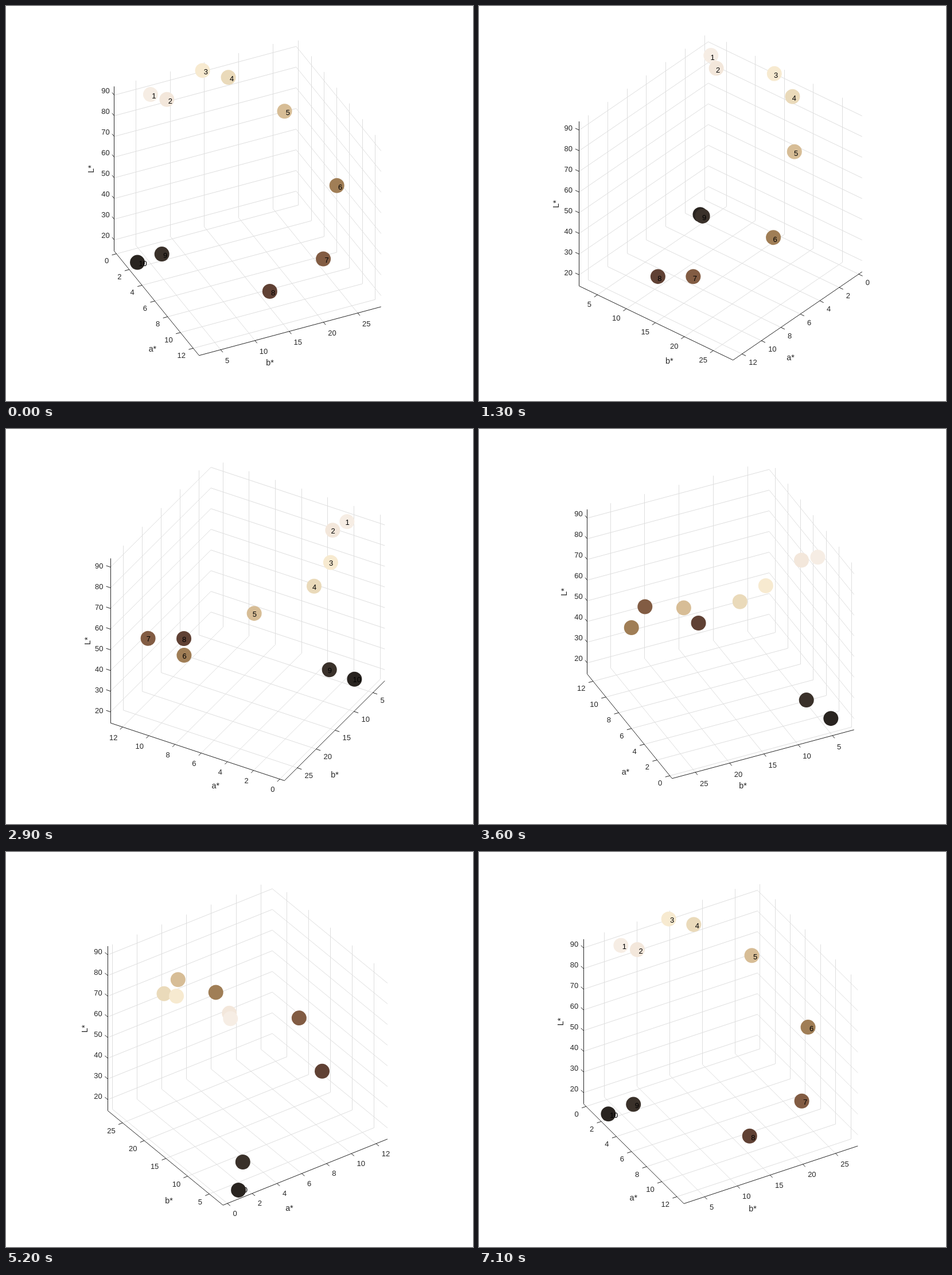
These frames come from a looping animation (814 px wide and 688 px high, 7.2 s). An HTML page:

```html
<!DOCTYPE html>
<html lang="en">
<head>
<meta charset="utf-8">
<title>Rotating L*a*b* plot</title>
<style>
  html, body { margin: 0; width: 100%; height: 100%; overflow: hidden; background: #fff; }
  svg { display: block; width: 814px; height: 688px; }
  text { font-family: "Liberation Sans", Arial, sans-serif; font-size: 13px; text-anchor: middle; fill: #262626; }
  .name { font-size: 14.3px; }
  .tag { text-anchor: start; fill: #000; }
  path { fill: none; stroke-width: 1; }
  .grid { stroke: #dedede; }
  .axis { stroke: #262626; }
</style>
</head>
<body>
<svg id="plot" viewBox="0 0 814 688"></svg>
<script>
const plot = document.getElementById("plot");
const CX = 421.2, CY = 332, SIDE = 350, TICK = 0.025;
const RAD = Math.PI / 180;
const SIN_EL = Math.sin(35 * RAD), COS_EL = Math.cos(35 * RAD);
const STEP_MS = 100, STEPS = 72;

// Axis ranges in the order a*, b*, L*
const LOW = [-0.35, 1.85, 14.61];
const HIGH = [12.92, 28.4, 94.21];
const TICKS = [
  [0, 2, 4, 6, 8, 10, 12],
  [5, 10, 15, 20, 25],
  [20, 30, 40, 50, 60, 70, 80, 90]
];

// a*, b*, L*, fill
const TONES = [
  [1.503, 5.422, 94.211, "#f6ede4"],
  [2.061, 7.28, 92.275, "#f3e7db"],
  [0.216, 14.205, 93.091, "#f7ead0"],
  [0.459, 17.748, 87.573, "#eadaba"],
  [3.471, 23.136, 77.902, "#d7bd96"],
  [7.783, 26.74, 55.142, "#a07e56"],
  [12.325, 20.53, 42.47, "#825c43"],
  [11.667, 13.335, 30.678, "#604134"],
  [2.69, 5.964, 21.069, "#3a312a"],
  [1.482, 3.525, 14.61, "#292420"]
];

const unit = (v, k) => (v - LOW[k]) / (HIGH[k] - LOW[k]) - 0.5;
const num = v => v.toFixed(2);

function label(x, y, str, cls = "", turn = false) {
  const rot = turn ? ` transform="rotate(-90 ${num(x)} ${num(y)})"` : "";
  const drop = cls === "name" ? 5 : 4.7;
  return `<text class="${cls}" x="${num(x)}" y="${num(y + drop)}"${rot}>${str}</text>`;
}

function segment(p, q) {
  if (Math.abs(p[0] - q[0]) < 0.01) {
    const x = Math.floor(p[0]) + 0.5;
    return `M${x} ${num(p[1])}V${num(q[1])}`;
  }
  return `M${num(p[0])} ${num(p[1])}L${num(q[0])} ${num(q[1])}`;
}

function draw(step) {
  const deg = 25 - 5 * step;
  const aligned = deg % 90 === 0;
  const phi = (deg + (aligned ? 1e-4 : 0)) * RAD;
  const s = Math.sin(phi), c = Math.cos(phi);

  const near = (a, b) => a * c - b * s;
  const project = ([a, b, l]) => [
    CX + SIDE * (a * s + b * c),
    CY + SIDE * (SIN_EL * near(a, b) - COS_EL * l)
  ];
  const depth = ([a, b, l]) => near(a, b) * COS_EL + l * SIN_EL;

  // Sides of the box that face the viewer
  const front = [c > 0 ? 0.5 : -0.5, s < 0 ? 0.5 : -0.5];
  const back = front.map(v => -v);
  let grid = "", axes = "", texts = "";

  for (const k of [0, 1]) {
    const m = 1 - k;
    const at = (u, v, l) => {
      const p = [0, 0, l];
      p[k] = u;
      p[m] = v;
      return project(p);
    };
    const out = Math.sign(front[m]);
    axes += segment(at(-0.5, front[m], -0.5), at(0.5, front[m], -0.5));

    for (const v of TICKS[k]) {
      const u = unit(v, k);
      grid += segment(at(u, -0.5, -0.5), at(u, 0.5, -0.5));
      grid += segment(at(u, back[m], -0.5), at(u, back[m], 0.5));

      const base = at(u, front[m], -0.5);
      const tip = at(u, front[m] + out * TICK, -0.5);
      axes += segment(base, tip);
      const len = Math.hypot(tip[0] - base[0], tip[1] - base[1]);
      const dx = (tip[0] - base[0]) / len, dy = (tip[1] - base[1]) / len;
      const half = String(v).length * 3.6;
      const steep = Math.abs(dx) < 0.5;
      const ox = steep ? 6 * dx : Math.sign(dx) * (half + 1.6 + 4 * Math.abs(dx));
      const oy = dy < 0.08 ? 1.8 : 9.5 + 8.2 * dy * dy;
      texts += label(tip[0] + ox, tip[1] + oy, v);
    }

    // Axis name, placed by the angle between the ticks and the horizontal
    const mid = at(0, front[m], -0.5);
    const side = out * (k ? s : c);
    const up = Math.abs(k ? c : s);
    const flat = Math.abs(side);
    const dir = Math.sign(side);
    const name = k ? "b*" : "a*";
    if (up < 0.1) {
      texts += label(mid[0] + dir * 56.5, mid[1] - 1, name, "name", true);
    } else {
      const ox = aligned ? 0 : dir * (48.6 - 3.4 * flat - 90.7 * up);
      texts += label(mid[0] + ox, mid[1] + 38 + 47 * flat - 3.5 * up, name, "name");
    }
  }

  // Vertical axis on the leftmost corner
  const corner = [s > 0 ? -0.5 : 0.5, c > 0 ? -0.5 : 0.5];
  const wall = corner[0] === back[0] ? 0 : 1;
  const foot = project([...corner, -0.5]), head = project([...corner, 0.5]);
  axes += segment(foot, head);
  for (const v of TICKS[2]) {
    const l = unit(v, 2);
    grid += segment(project([back[0], -0.5, l]), project([back[0], 0.5, l]));
    grid += segment(project([-0.5, back[1], l]), project([0.5, back[1], l]));

    const end = [...corner, l];
    end[wall] += Math.sign(corner[wall]) * TICK;
    const base = project([...corner, l]), tip = project(end);
    axes += segment(base, tip);
    const len = Math.hypot(tip[0] - base[0], tip[1] - base[1]);
    const dx = (tip[0] - base[0]) / len, dy = (tip[1] - base[1]) / len;
    texts += label(tip[0] - 10 - 2.4 * Math.abs(dx), tip[1] + 0.8 + 6.5 * dy * Math.abs(dy), v);
  }
  texts += label(foot[0] - 40.2, (foot[1] + head[1]) / 2 + 0.5, "L*", "name", true);

  // Dots and their numbers, far to near
  const items = [];
  TONES.forEach((tone, i) => {
    const dot = tone.slice(0, 3).map(unit);
    const tag = tone.slice(0, 3).map((v, k) => unit(v + 0.1, k));
    const [x, y] = project(dot), [tx, ty] = project(tag);
    items.push([depth(dot), `<circle cx="${num(x)}" cy="${num(y)}" r="13" fill="${tone[3]}"/>`]);
    items.push([depth(tag), label(tx, ty + 1.5, i + 1, "tag")]);
  });
  items.sort((p, q) => p[0] - q[0]);

  plot.innerHTML =
    `<path class="grid" d="${grid}"/><path class="axis" d="${axes}"/>` +
    texts + items.map(p => p[1]).join("");
}

let shown = -1;
const start = performance.now();
function tick() {
  const step = Math.floor((performance.now() - start) / STEP_MS) % STEPS;
  if (step !== shown) draw(shown = step);
  requestAnimationFrame(tick);
}
tick();
</script>
</body>
</html>
```
